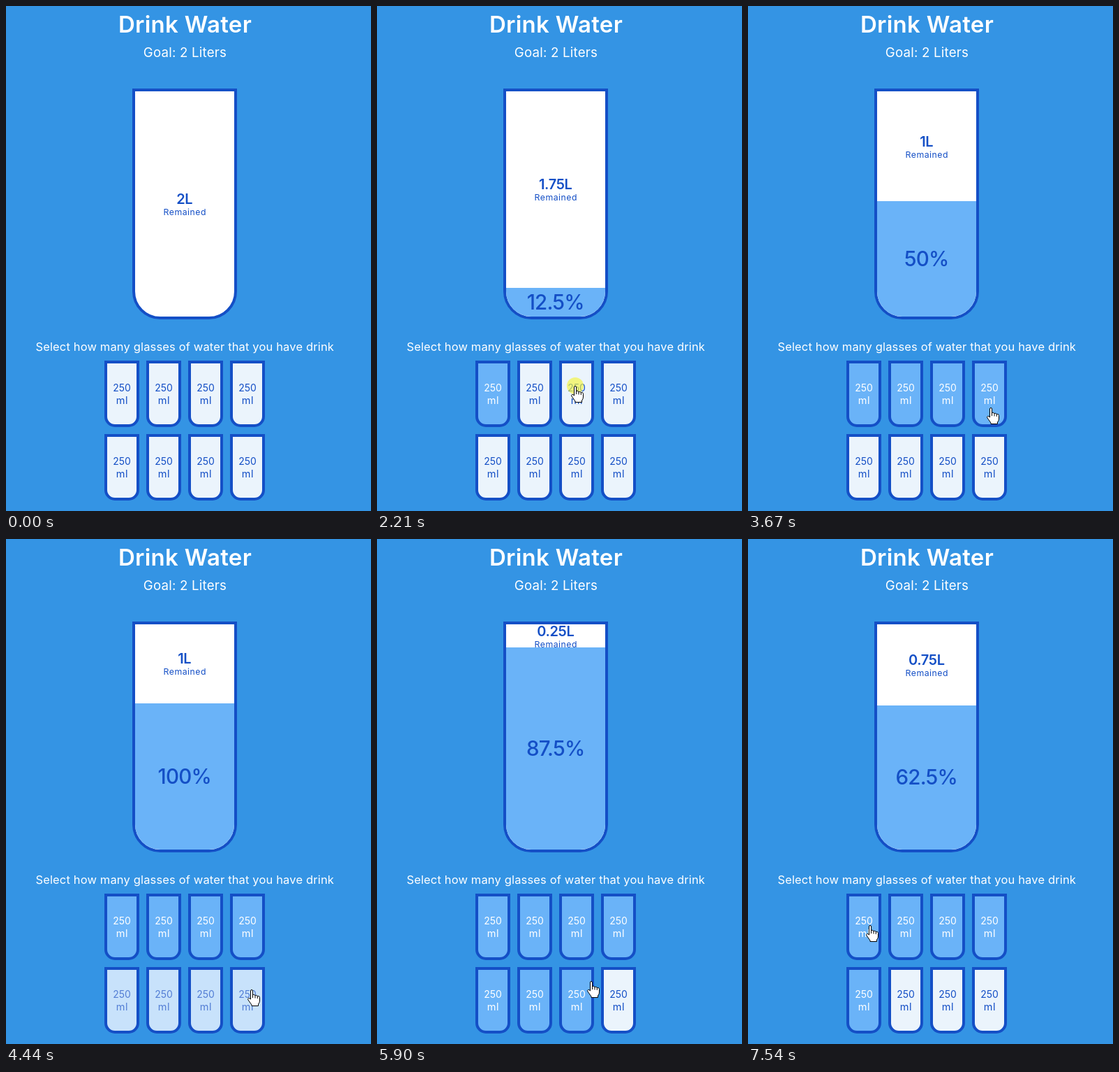
These frames come from a looping animation (523x722 px, 8 s). An HTML page:

```html
<!DOCTYPE html>
<html lang="en">
<head>
<meta charset="utf-8">
<title>Drink Water</title>
<style>
  html, body { margin: 0; width: 100%; height: 100%; overflow: hidden; background: #3494e4; }
  svg { display: block; width: 100%; height: 100%; }
  text { font-family: Inter, "Open Sans", sans-serif; text-anchor: middle; }
  .light { fill: #fff; }
  .ink { fill: #144fc6; }
  .glass { stroke: #144fc6; stroke-width: 4; }
  .cursor { fill: #fff; stroke: #000; stroke-linejoin: round; }
</style>
</head>
<body>
<svg id="stage" viewBox="0 0 523 722"></svg>
<script>
const LOOP = 8000, STEP = 1000 / 13, STEP_START = 52;
const CUPS = 8, CUP_ML = 250, FADE = 300;
const PRESS_TIME = 150, CLICK_DELAY = 100;
const EMPTY = [235, 244, 252], FULL = [106, 179, 248];
const INK = [20, 79, 198], WHITE = [255, 255, 255];

// The pointer glides along one curve per leg; "bend" is the control point.
const entry = [503, 517];
const legs = [
  { start: 52, end: 975, to: [167, 562], bend: [165, 380] },
  { start: 1480, end: 2052, to: [284, 543] },
  { start: 2700, end: 3052, to: [331, 541] },
  { start: 3436, end: 4120, to: [352, 644], bend: [371, 607] },
  { start: 5570, end: 6510, to: [186, 651], bend: [272, 613] },
  { start: 7050, end: 7513, to: [175, 552] }
];
const presses = [1125, 2205, 3125, 4280, 5200, 6660];

const stage = document.getElementById("stage");

function add(parent, tag, attrs, content = "") {
  const node = document.createElementNS("http://www.w3.org/2000/svg", tag);
  for (const name in attrs) node.setAttribute(name, attrs[name]);
  node.textContent = content;
  parent.appendChild(node);
  return node;
}

function label(parent, content, x, y, size, spacing, weight, cls) {
  return add(parent, "text", {
    x, y, class: cls, "font-size": size, "font-weight": weight, "letter-spacing": spacing
  }, content);
}

const cupPath = (x, y, w, h, r) =>
  `M${x} ${y}h${w}v${h - r}a${r} ${r} 0 0 1 ${-r} ${r}h${2 * r - w}a${r} ${r} 0 0 1 ${-r} ${-r}z`;
const show = (node, on) => node.setAttribute("visibility", on ? "visible" : "hidden");
const mix = (a, b, p) => a + (b - a) * p;
const mixAll = (a, b, p) => a.map((v, i) => mix(v, b[i], p));
const mixColor = (a, b, p) => `rgb(${mixAll(a, b, p).map(Math.round)})`;
const smooth = p => p * p * (3 - 2 * p);

// CSS "ease": cubic-bezier(.25, .1, .25, 1)
function ease(p) {
  if (p <= 0) return 0;
  if (p >= 1) return 1;
  const curve = (s, a, b) => 3 * a * s * (1 - s) ** 2 + 3 * b * s * s * (1 - s) + s ** 3;
  let low = 0, high = 1;
  for (let i = 0; i < 18; i++) {
    const mid = (low + high) / 2;
    if (curve(mid, .25, .25) < p) low = mid; else high = mid;
  }
  return curve(low, .1, 1);
}

function pointerAt(t) {
  let from = entry;
  for (const { start, end, to, bend = mixAll(from, to, .5) } of legs) {
    if (t < start) break;
    const s = smooth(Math.min(1, (t - start) / (end - start)));
    from = mixAll(mixAll(from, bend, s), mixAll(bend, to, s), s);
  }
  return from;
}

const corner = i => [141 + 60 * (i % 4), 507 + 105 * Math.floor(i / 4)];

function cupAt([x, y]) {
  for (let i = 0; i < CUPS; i++) {
    const [left, top] = corner(i);
    if (x >= left && x <= left + 50 && y >= top && y <= top + 95) return i;
  }
  return -1;
}

// A press fills up to the cup under the pointer; pressing the last full cup empties it.
let count = 0;
const changes = [{ start: -FADE, from: 0, to: 0 }];
for (const press of presses) {
  const from = count, cup = cupAt(pointerAt(press));
  count = cup + 1 === from ? cup : cup + 1;
  changes.push({ start: press + CLICK_DELAY, from, to: count });
}

add(stage, "rect", { width: 523, height: 722, fill: "#3494e4" });
label(stage, "Drink Water", 256.5, 38, 33, .3, 600, "light");
label(stage, "Goal: 2 Liters", 256.4, 73, 18.7, .2, 400, "light");
label(stage, "Select how many glasses of water that you have drink", 256.2, 493, 16.5, .15, 400, "light");

// Large cup
const clip = add(stage, "clipPath", { id: "inside" });
add(clip, "path", { d: cupPath(185, 122, 142, 322, 36) });
add(stage, "path", { d: cupPath(183, 120, 146, 326, 38), class: "glass", fill: "#fff" });
const inside = add(stage, "g", { "clip-path": "url(#inside)" });
const remained = add(inside, "g", {});
const liters = label(remained, "", 255.8, 0, 20, -.35, 600, "ink");
label(remained, "Remained", 256.3, 16, 12.3, .5, 400, "ink");
const water = add(inside, "rect", { x: 185, width: 142, fill: "#6ab3f8" });
const percent = label(inside, "", 255.7, 0, 29.5, -.8, 500, "ink");

// Small cups
const cups = Array.from({ length: CUPS }, (_, i) => {
  const [x, y] = corner(i);
  const glass = add(stage, "path", { d: cupPath(x + 2, y + 2, 46, 91, 13), class: "glass" });
  const words = add(stage, "g", {});
  label(words, CUP_ML, x + 25, y + 44, 14, 0, 400, "");
  label(words, "ml", x + 25.3, y + 62, 14.5, .5, 400, "");
  return { glass, words };
});

// Pointer
const spot = add(stage, "circle", { r: 12, fill: "#f5f53c", opacity: .65 });
const arrow = add(stage, "path", {
  class: "cursor", d: "M0 0V16.5L3.8 13 6.3 18.8 8.6 17.8 6.2 12.2H11.3Z"
});
const hand = add(stage, "path", {
  class: "cursor",
  d: "M-1.5 14V2Q-1.5 .5 0 .5T1.5 2V8Q2 7.3 3.2 7.3T5 9Q5.5 8.3 6.7 8.3T8.3 10" +
     "Q9 9.4 9.9 9.5Q11.5 9.8 11.5 11.5V16Q11.5 19 9.5 21V23.5H0V22L-5 15" +
     "Q-6 13 -4.5 12.5Q-3 12 -1.5 14ZM1.5 8V12M5 9V12.5M8.3 10V13"
});

function drawWater(t) {
  const { start, from, to } = changes.filter(change => change.start <= t).pop();
  const p = ease((t - start) / FADE);

  const height = Math.min(322, mix(from, to, p) * 330 / CUPS);
  const top = Math.round(444 - height);
  water.setAttribute("y", top);
  water.setAttribute("height", 444 - top);
  percent.setAttribute("y", 444 - height / 2 + 10.5);
  percent.textContent = to ? to / CUPS * 100 + "%" : "";

  const shown = to === CUPS ? from : to;
  liters.textContent = (CUPS - shown) * CUP_ML / 1000 + "L";
  remained.setAttribute("transform", `translate(0 ${Math.round((122 + 444 - height) / 2)})`);
  show(remained, to < CUPS || p < 1);

  cups.forEach((cup, i) => {
    const fill = mix(i < from ? 1 : 0, i < to ? 1 : 0, p);
    cup.glass.setAttribute("fill", mixColor(EMPTY, FULL, fill));
    cup.words.setAttribute("fill", mixColor(INK, WHITE, fill));
  });
}

function drawPointer(t) {
  const [x, y] = pointerAt(t).map(Math.round);
  const visible = t >= legs[0].start;
  const over = cupAt([x, y]) >= 0;
  for (const node of [spot, arrow, hand]) node.setAttribute("transform", `translate(${x} ${y})`);
  show(spot, presses.some(press => t >= press && t < press + PRESS_TIME));
  show(hand, visible && over);
  show(arrow, visible && !over);
}

// The picture advances at 13 steps per second.
function draw(time) {
  const t = STEP_START + Math.floor((time % LOOP - STEP_START) / STEP) * STEP;
  drawWater(t);
  drawPointer(t);
}

const begin = performance.now();
function tick() {
  draw(performance.now() - begin);
  requestAnimationFrame(tick);
}
tick();
</script>
</body>
</html>
```
